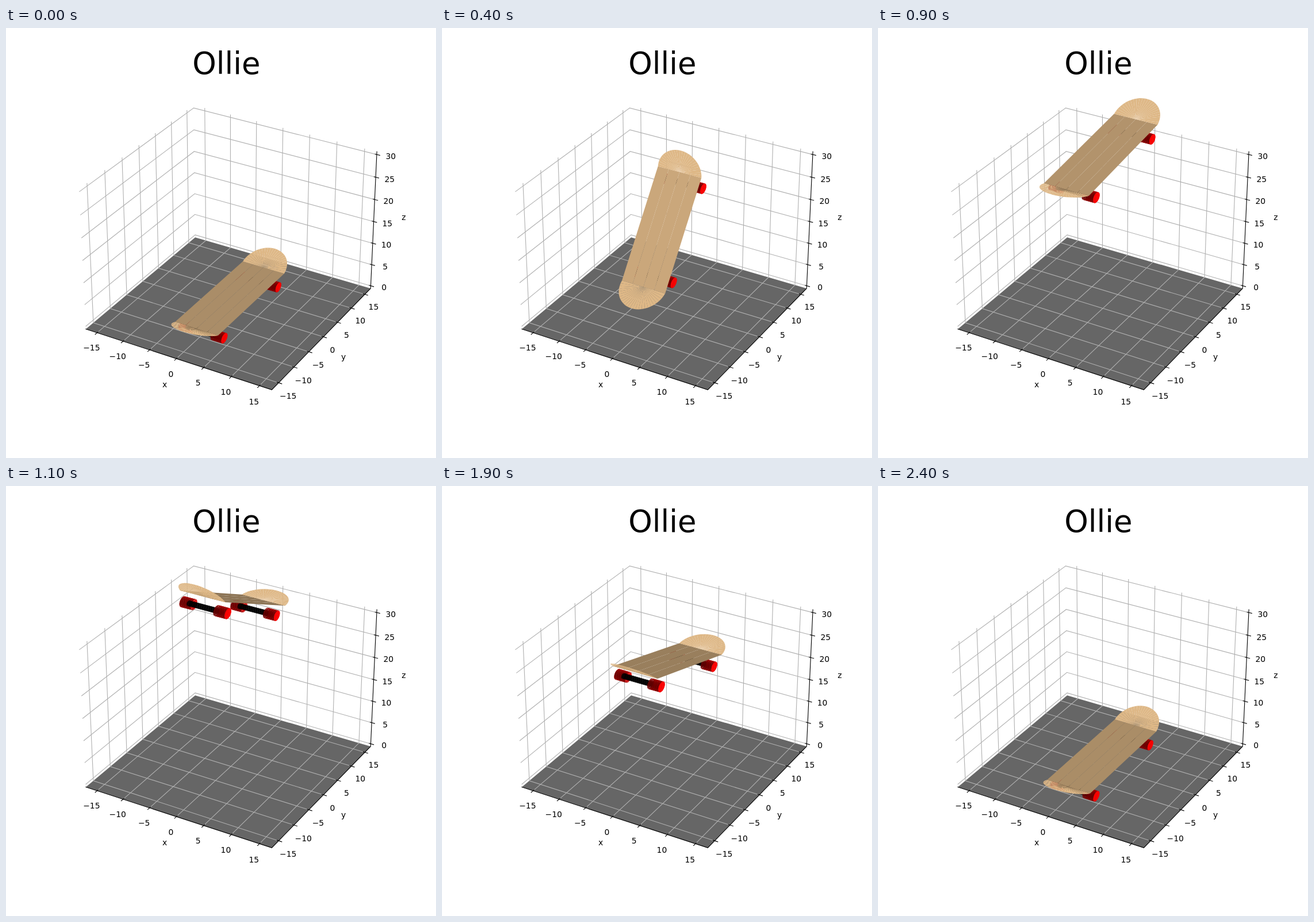
These frames come from a looping animation (748 px wide and 748 px high, 2500 ms). An HTML page:

```html
<!DOCTYPE html>
<html lang="en">
<head>
<meta charset="utf-8">
<title>Ollie</title>
<style>
  html, body { margin: 0; width: 100%; height: 100%; overflow: hidden; background: #fff; }
  svg { display: block; width: 748px; height: 748px; }
  text { font-family: "DejaVu Sans", sans-serif; font-size: 13.89px; text-anchor: middle; }
  .title { font-size: 52.8px; }
  .grid { stroke: #b0b0b0; stroke-width: 1.11; fill: none; }
  .axis { stroke: #000; stroke-width: 1.11; fill: none; stroke-linecap: square; }
</style>
</head>
<body>
<svg viewBox="0 0 748 748">
  <g id="stage"></g>
  <g id="board"></g>
</svg>
<script>
const STEP_MS = 100, STEPS = 25;
const EDGE = 16.5 * 25 / 24, LOW = -0.625, HIGH = 30.625;
const WOOD = [222, 184, 135], RED = [255, 0, 0], BLACK = [0, 0, 0];

// Perspective camera: azimuth -60, elevation 30, distance 10.
function project([x, y, z]) {
  const X = x * 1.142857 / 33, Y = y * 1.142857 / 33, Z = (z - 15) * 0.857143 / 30;
  const c = Math.sqrt(3) / 2;
  const depth = 10 - c / 2 * X + 0.75 * Y - 0.5 * Z;
  const scale = 3113.3 / depth;
  return [
    391.13 + scale * (c * X + 0.5 * Y),
    369.96 - scale * (-0.25 * X + c / 2 * Y + c * Z),
    depth
  ];
}

const range = (from, to, step) =>
  Array.from({ length: Math.round((to - from) / step) + 1 }, (_, i) => from + i * step);
const outline = points => points.map(p => p[0].toFixed(2) + ',' + p[1].toFixed(2)).join(' ');
const line = (kind, ...points) =>
  `<polyline class="${kind}" points="${outline(points.map(project))}"/>`;
const polygon = (points, fill) => `<polygon points="${outline(points)}" fill="${fill}"/>`;
const label = (text, x, y, kind = '') => `<text class="${kind}" x="${x}" y="${y}">${text}</text>`;

function tickLabel(value, at) {
  const [x, y] = project(at);
  return label(String(value).replace('-', '\u2212'), x.toFixed(2), (y + 11.1).toFixed(2));
}

function drawStage() {
  const E = EDGE, out = 0.55, inn = 0.275, padXY = 1.68, padZ = 1.52;
  const floor = [[-E, -E, LOW], [E, -E, LOW], [E, E, LOW], [-E, E, LOW]];
  let grid = '', axes = '', texts = '';
  for (const v of range(-15, 15, 5)) {
    grid += line('grid', [v, -E, LOW], [v, E, LOW], [v, E, HIGH]);
    grid += line('grid', [E, v, LOW], [-E, v, LOW], [-E, v, HIGH]);
    axes += line('axis', [v, -E - out, LOW], [v, -E + inn, LOW]);
    axes += line('axis', [E + out, v, LOW], [E - inn, v, LOW]);
    texts += tickLabel(v, [v, -E - padXY, LOW - padZ]);
    texts += tickLabel(v, [E + padXY, v, LOW - padZ]);
  }
  for (const v of range(0, 30, 5)) {
    grid += line('grid', [-E, -E, v], [-E, E, v], [E, E, v]);
    axes += line('axis', [E + out, E, v], [E - inn, E, v]);
    texts += tickLabel(v, [E + padXY, E + padXY, v]);
  }
  axes += line('axis', floor[0], floor[1], floor[2], [E, E, HIGH]);
  texts += label('x', 276, 624.5) + label('y', 587, 576.5) + label('z', 692, 333.5);
  texts += label('Ollie', 383.35, 79.5, 'title');
  document.getElementById('stage').innerHTML =
    polygon(floor.map(project), '#666') + grid + axes + texts;
}

function pose(step) {
  const swing = Math.sin(Math.PI * step / 24);
  const degrees = step <= 10 ? 60 * Math.sin(step / 3) : -30 * swing;
  return { tilt: degrees * Math.PI / 180, lift: 35 * swing };
}

function boardMarkup({ tilt, lift }) {
  const cos = Math.cos(tilt), sin = Math.sin(tilt);
  const place = ([x, y, z]) => project([x, y * cos - z * sin, y * sin + z * cos + lift]);
  const face = (points, color) => polygon(points.map(place), `rgb(${color.map(Math.round)})`);

  // Light comes from (-2, -2, 1) / 3; the normal lies in the y-z plane.
  const shade = (color, ny, nz) => {
    const level = 0.65 + 0.35 * (nz - 2 * ny) / 3;
    return color.map(c => c * level);
  };

  function tube(x0, x1, y0, r, color) {
    const n = 30, turn = 2 * Math.PI / n;
    const at = (x, a) => [x, y0 + r * Math.cos(a), r * Math.sin(a)];
    return range(0, n - 1, 1).map(k => {
      const a = k * turn, b = a + turn, mid = a + turn / 2;
      return {
        depth: place(at((x0 + x1) / 2, mid))[2],
        svg: face([at(x0, a), at(x1, a), at(x1, b), at(x0, b)],
          shade(color, -Math.cos(mid + tilt), -Math.sin(mid + tilt)))
      };
    }).sort((p, q) => q.depth - p.depth).map(f => f.svg).join('');
  }

  function fan(center, rim, sweep, n, color) {
    return range(0, n - 1, 1).map(k =>
      face([center, rim(k * sweep / n), rim((k + 1) * sweep / n)], color)).join('');
  }

  const cap = (x, y0) => fan([x, y0, 0],
    a => [x, y0 + Math.cos(a), Math.sin(a)], 2 * Math.PI, 24, RED);

  const truck = y => cap(-4, y) + tube(-4, -2, y, 1, RED) +
    tube(-3, 3, y, 0.5, BLACK) + tube(2, 4, y, 1, RED) + cap(4, y);

  const kick = side => fan([0, side * 11, 2], a => [
    4 * Math.cos(a), side * (11 + 4 * Math.sin(a)), 2 + 2 * Math.sin(a)
  ], Math.PI, 25, WOOD);

  const deckColor = shade(WOOD, -sin, cos);
  const deck = [-4, -2, 0, 2].map(x =>
    face([[x, -11, 2], [x + 2, -11, 2], [x + 2, 11, 2], [x, 11, 2]], deckColor)).join('');

  return truck(9) + truck(-9) + deck + kick(1) + kick(-1);
}

const board = document.getElementById('board');
let shown = -1;

function render(time) {
  const step = Math.floor(time / STEP_MS) % STEPS;
  if (step !== shown) {
    shown = step;
    board.innerHTML = boardMarkup(pose(step));
  }
}

drawStage();
render(0);
const start = performance.now();
function tick() {
  render(performance.now() - start);
  requestAnimationFrame(tick);
}
requestAnimationFrame(tick);
</script>
</body>
</html>
```
